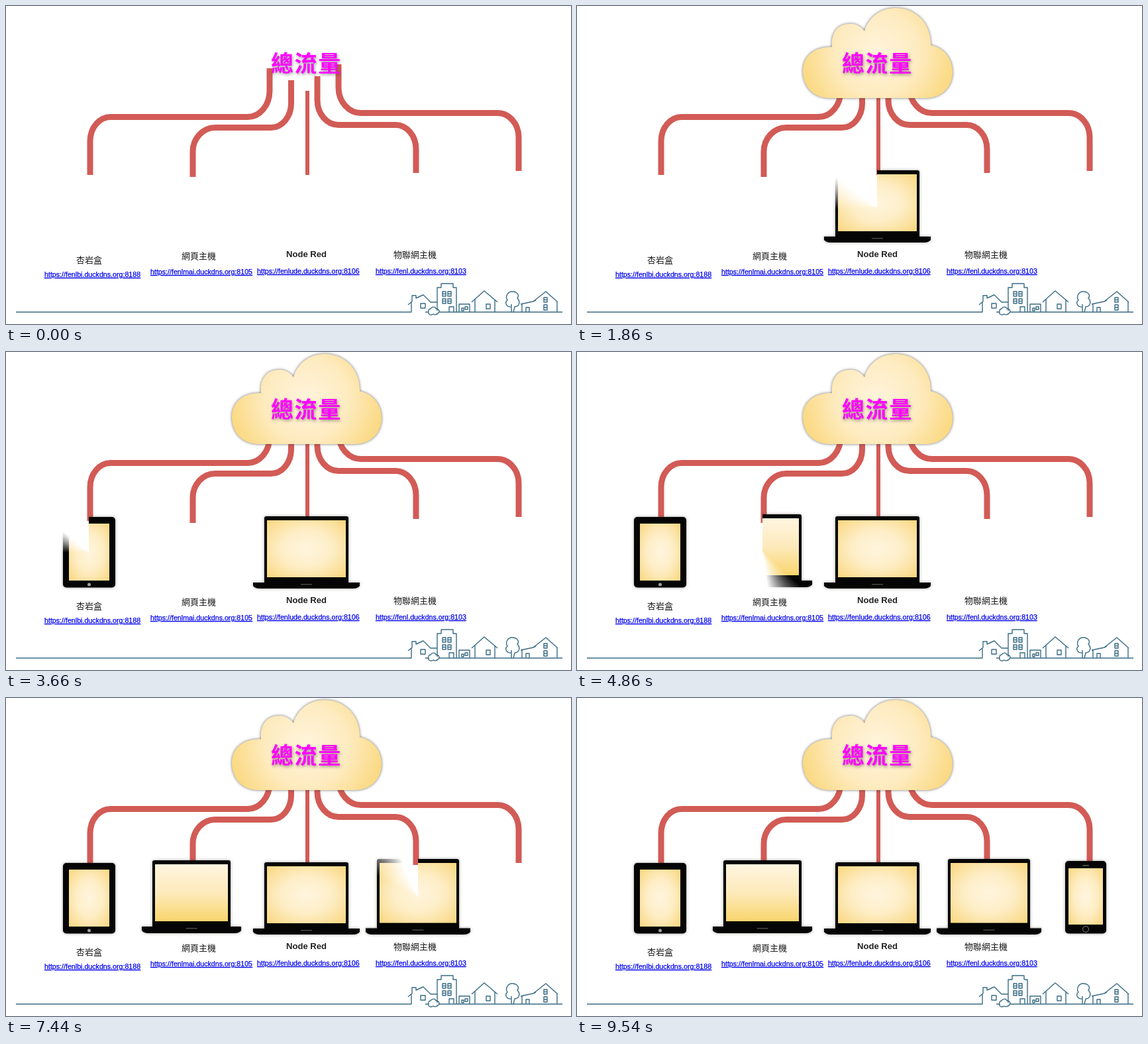
Animation of 853 by 480 pixels, one loop 9.6 s. Source, as an HTML page:

```html
<!DOCTYPE html>
<html lang="zh-Hant">
<head>
<meta charset="utf-8">
<title>總流量</title>
<style>
  @property --t { syntax: "<number>"; inherits: true; initial-value: 0; }
  @keyframes run { from { --t: 0; } to { --t: 9600; } }

  html, body { margin: 0; width: 100%; height: 100%; overflow: hidden; background: #fff; }
  #stage {
    position: relative; width: 853px; height: 480px; overflow: hidden;
    animation: run 9600ms steps(160) infinite;
  }
  svg { position: absolute; left: 0; top: 0; width: 853px; height: 480px; }

  .cloud { opacity: clamp(0, var(--t) / 480, 1); }
  .cloud path { filter: drop-shadow(0 0 2px rgba(50, 50, 50, .7)); }
  .device { filter: drop-shadow(0 0 2px rgba(60, 55, 45, .5)); }

  /* Soft clockwise wheel: a 40deg feathered edge sweeps one full turn */
  .wheel {
    --a: calc(clamp(0, (var(--t) - var(--start)) / 1800, 1) * 400deg);
    --m: conic-gradient(from 0deg at var(--cx) var(--cy), #000 calc(var(--a) - 40deg), transparent var(--a));
    -webkit-mask-image: var(--m);
    mask-image: var(--m);
  }

  .pipes { fill: none; stroke: #d25b56; stroke-width: 9; }
  .town { fill: none; stroke: #3a6c85; stroke-width: 1.4; stroke-linejoin: round; }
  .label { font: 13px "Noto Sans CJK TC", "Noto Sans CJK", sans-serif; fill: #181818; }
  .latin { font: bold 13.1px "Liberation Sans", Arial, sans-serif; fill: #222; }
  .link {
    font: 10.67px "Liberation Sans", Arial, sans-serif; fill: #00e;
    stroke: #00e; stroke-width: .25px;
    text-decoration: underline; text-decoration-skip-ink: none;
  }
  .title {
    font: bold 34px "Noto Sans CJK TC", "Noto Sans CJK", sans-serif;
    letter-spacing: 1.6px; fill: #f0f;
    filter: drop-shadow(1px 2px 2px rgba(60, 60, 60, .5));
  }
</style>
</head>
<body>
<div id="stage">
  <svg>
    <defs>
      <radialGradient id="glow" r=".72">
        <stop offset="0" stop-color="#fff5de"/>
        <stop offset=".45" stop-color="#feeec7"/>
        <stop offset="1" stop-color="#f9d67c"/>
      </radialGradient>
      <linearGradient id="fall" x2="0" y2="1">
        <stop offset="0" stop-color="#fff5e0"/>
        <stop offset=".5" stop-color="#fdeabb"/>
        <stop offset="1" stop-color="#f9d56d"/>
      </linearGradient>
      <radialGradient id="sky" gradientUnits="userSpaceOnUse" cx="454" cy="71" r="124">
        <stop offset="0" stop-color="#fff4dc"/>
        <stop offset=".5" stop-color="#feebc0"/>
        <stop offset="1" stop-color="#fad77a"/>
      </radialGradient>
    </defs>

    <g class="pipes">
      <path d="M127 255V204A31 36.500 0 0 1 158 167.500H365A33 39.500 0 0 0 398 128V94"/>
      <path d="M282 258V220A34 36.500 0 0 1 316 183.500H400A30.500 36.500 0 0 0 430.500 147V112"/>
      <path d="M455 128V255" stroke-width="6"/>
      <path d="M470 106V142A32 37.500 0 0 0 502 179.500H588A31 36.500 0 0 1 619 216V252"/>
      <path d="M502 88V123A34 38.500 0 0 0 536 161.500H742A32 36.500 0 0 1 774 198V249"/>
    </g>

    <g class="town">
      <path d="M15 462H612V447M607 451L613 446V437H619V441L630 436L641 447H651"/>
      <path d="M626 449h7v7h-7zM651 460V425H657V419H675V425H680V462"/>
      <path d="M659 431h5v7h-5zM667 431h5v7h-5zM659 442h5v7h-5zM667 442h5v7h-5zM659 434.500h5M667 434.500h5M659 445.500h5M667 445.500h5M669 462V454H676V462"/>
      <path d="M633 462H638C637 457 641 457 641 457C643 453 649 454 649 457C654 457 655 461 653 463C650 467 646 466 645 465C641 468 637 465 638 462M654 462H840"/>
      <path d="M684 462V450H700V462M688 456h3v4h-3zM693 454h4v4h-4z"/>
      <path d="M703 447L722 430L742 447M708 443V462M738 444V462M725 450h6v7h-6z"/>
      <path d="M763 462V450M763 454C756 455 752 448 757 444C753 438 758 431 764 431C771 431 776 436 772 441C777 446 775 454 768 454L766 462"/>
      <path d="M777 450L796 446L815 431L833 447M779 450V462M832 446V462M796 446L800 444M785 462V455H790V462M812 440h5v7h-5zM812 451h5v8h-5zM812 443.500h5M812 455h5"/>
    </g>
  </svg>

  <svg class="cloud">
    <path fill="url(#sky)"
      d="M380 139C355 138 341 120 341 98C341 76 358 61 385 62C383 40 394 27 411 27C420 26 428 30 434 38C440 17 458 3 481 3C512 3 535 27 534 59C553 63 567 78 567 100C567 122 551 139 526 139Z"/>
  </svg>

  <div id="devices"></div>

  <svg>
    <text class="title" x="400" y="99">總流量</text>
    <text class="label" x="106" y="388">杏岩盒</text>
    <text class="label" x="265" y="382">網頁主機</text>
    <text class="label latin" x="423" y="379">Node Red</text>
    <text class="label" x="585" y="380">物聯網主機</text>
    <text class="link" x="58" y="409">https://fenlbi.duckdns.org:8188</text>
    <text class="link" x="218" y="405">https://fenlmai.duckdns.org:8105</text>
    <text class="link" x="379" y="404">https://fenlude.duckdns.org:8106</text>
    <text class="link" x="558" y="404">https://fenl.duckdns.org:8103</text>
  </svg>
</div>

<script>
  const rect = (x0, y0, x1, y1, fill, r = 0) =>
    `<rect x="${x0}" y="${y0}" width="${x1 - x0}" height="${y1 - y0}" rx="${r}" fill="${fill}"/>`;

  const wheel = (start, cx, cy, art) =>
    `<svg class="wheel" style="--start:${start};--cx:${cx}px;--cy:${cy}px"><g class="device">${art}</g></svg>`;

  // Lid from x0 to x1, hinge at y1, base from b0 to b1
  function laptop(x0, y0, x1, y1, b0, b1, bottom, fill) {
    const mid = (b0 + b1) / 2;
    return rect(x0, y0, x1, y1 + 2, "#050505", 3) +
      rect(x0 + 4, y0 + 6, x1 - 4, y1 - 8, fill) +
      `<path fill="#050505" d="M${b0} ${y1}H${b1}V${bottom - 4}Q${b1 - 3} ${bottom} ${b1 - 10} ${bottom}H${b0 + 10}Q${b0 + 3} ${bottom} ${b0} ${bottom - 4}Z"/>` +
      rect(mid - 8.5, y1 + 2, mid + 8.5, y1 + 3.5, "#454845");
  }

  const tablet = rect(86, 249, 165, 355.5, "#050505", 5) +
    rect(95, 259, 156, 345, "url(#glow)") +
    '<circle cx="125.500" cy="351" r="2.500" fill="#a0a0a0"/>';

  const phone = rect(737, 246, 799, 355.5, "#050505", 5) +
    rect(742, 257, 794, 342, "url(#glow)") +
    rect(763, 252, 773, 253.5, "#596059", 0.7) +
    '<circle cx="768" cy="349" r="4.500" fill="none" stroke="#7d847d"/>';

  document.getElementById("devices").innerHTML = [
    wheel(480, 453, 304, laptop(390, 248, 517, 348, 373, 534, 357, "url(#glow)")),
    wheel(2270, 125.5, 302, tablet),
    wheel(4085, 280, 301, laptop(221, 245, 339, 345, 205, 355, 355, "url(#fall)")),
    wheel(5925, 622, 300, laptop(560, 243, 684, 347.5, 543, 701, 357, "url(#glow)")),
    wheel(7720, 768, 301, phone)
  ].join("");
</script>
</body>
</html>
```
